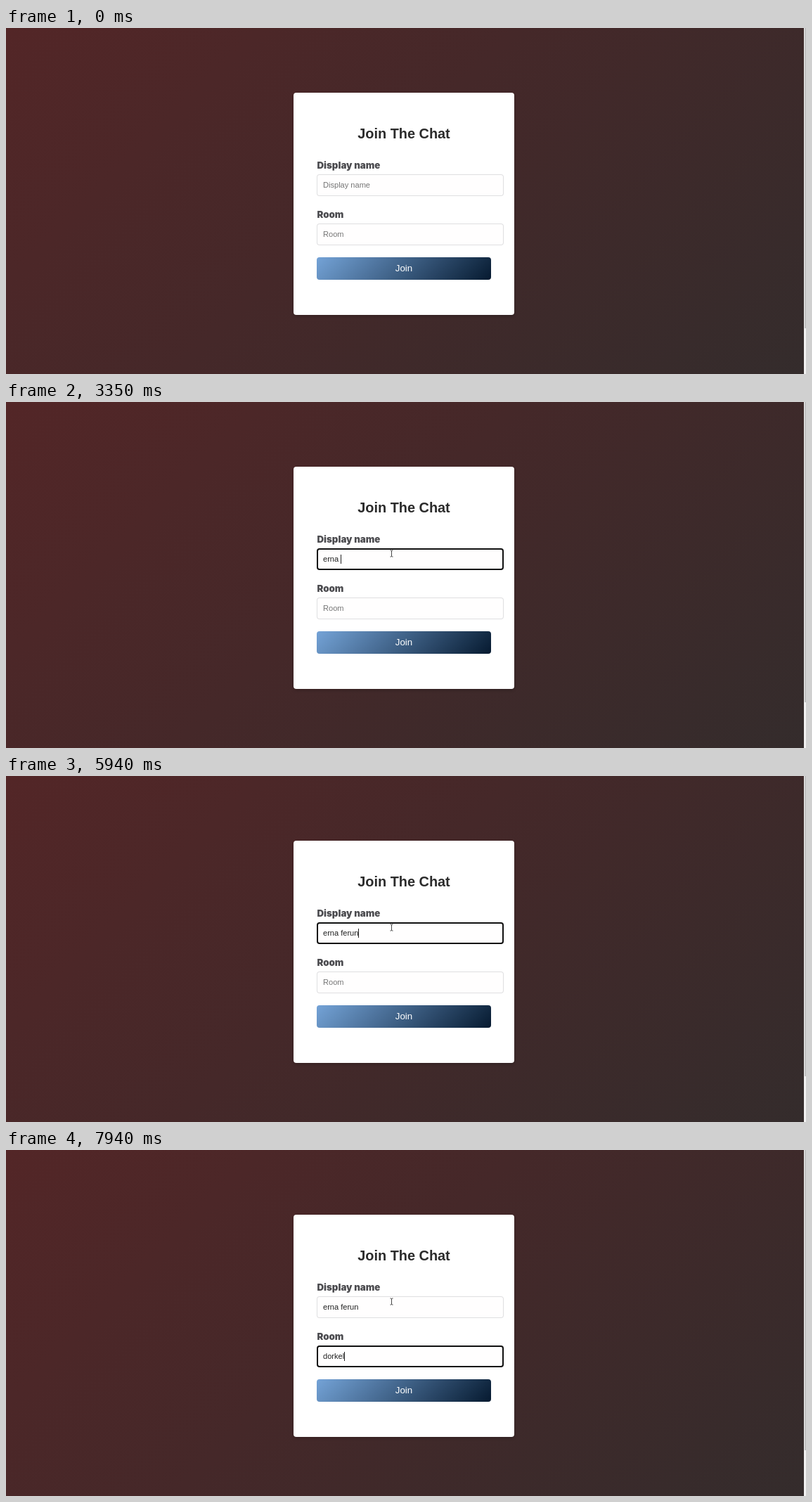
Write an HTML page that moves like this. It is 1138 px wide and 492 px high and loops after 8000 ms.

```html
<!DOCTYPE html>
<html lang="en">
<head>
<meta charset="utf-8">
<title>Join The Chat</title>
<style>
  html, body { margin: 0; width: 100%; height: 100%; overflow: hidden; }
  body {
    position: relative;
    background: linear-gradient(135deg, #532627, #452829 45%, #342c2c);
    font-family: "Liberation Sans", Arial, sans-serif;
  }
  body * { position: absolute; box-sizing: border-box; white-space: pre; }
  .card {
    left: 409px; top: 91.5px; width: 314px; height: 316px;
    border-radius: 4px; background: #fff;
    box-shadow: 0 2px 4px rgba(0, 0, 0, .2);
  }
  h1 {
    left: 409px; top: 134.6px; width: 314px; margin: 0;
    font-size: 19.9px; line-height: 30px; text-align: center; color: #2b2b2b;
  }
  label {
    left: 442.5px; color: #4c4c50;
    font: 900 13.3px/20px Inter, "Liberation Sans", sans-serif;
  }
  .field {
    left: 442px; width: 265.5px; height: 31px; padding-left: 9px;
    border-radius: 4px; background: #fffefe;
    box-shadow: inset 0 0 0 1px #dfdfe1;
    font-size: 11.07px; line-height: 31px; color: #212121;
  }
  .field.focus { box-shadow: inset 0 0 0 2px #101010; }
  .field span { position: static; }
  .hint { color: #757575; }
  .caret { top: 9px; width: 1px; height: 13px; background: #222; visibility: hidden; }
  .button {
    left: 442px; top: 326px; width: 248px; height: 31.5px;
    border-radius: 4px; background: linear-gradient(135deg, #74a3d7, #061a30);
    font-size: 13.3px; line-height: 31px; text-align: center; color: #fff;
  }
  .track { left: 1135px; top: 0; width: 3px; height: 100%; background: #f1f1f1; }
  .thumb { left: 1px; top: 0; width: 2px; height: 427px; background: #c1c1c1; }
  svg { left: 0; top: 0; }
</style>
</head>
<body>
<div class="card"></div>
<h1>Join The Chat</h1>
<label style="top:185.2px">Display name</label>
<div class="field" id="name" style="top:208px"><span class="text"></span><i class="caret"></i><span class="hint">Display name</span></div>
<label style="top:255.2px">Room</label>
<div class="field" id="room" style="top:278px"><span class="text"></span><i class="caret"></i><span class="hint">Room</span></div>
<div class="button">Join</div>
<div class="track"><div class="thumb"></div></div>
<svg width="1138" height="492">
  <g id="pointer">
    <circle id="halo" cx="-1.3" cy="0" r="9" fill="#ffff80"/>
    <path id="beam" d="M-2-4.5H-.5L0-4L.5-4.5H2M0-4V4M-2 4.5H-.5L0 4L.5 4.5H2" fill="none" stroke="#333" stroke-width=".9"/>
    <path id="arrow" d="M0 0V13.5L3.1 10.6L5.2 15.4L7.3 14.5L5.2 9.8H9.6Z" fill="#fff" stroke="#000" stroke-width=".8"/>
  </g>
</svg>
<script>
const LOOP = 8000, BLINK = 530;
const CLICK = 610, FOCUS = 690, TAB = 6270;
const START = [864, 413], END = [548.5, 215.5];

// Each key press: time and the text it leaves
const nameKeys = [
  [FOCUS, ""], [2350, "e"], [2550, "er"], [2820, "ern"], [2890, "erna"],
  [3350, "erna "], [3480, "erna f"], [3600, "erna fe"], [3740, "erna fer"],
  [3870, "erna feru"], [4000, "erna ferun"], [4330, "erna feru"],
  [4530, "erna fer"], [4600, "erna fe"], [4670, "erna f"], [4870, "erna fr"],
  [5330, "erna f"], [5410, "erna fr"], [5610, "erna fe"], [5720, "erna fer"],
  [5830, "erna feru"], [5940, "erna ferun"]
];
const roomKeys = [
  [TAB, ""], [6890, "d"], [6970, "do"], [7070, "dor"],
  [7270, "dork"], [7540, "dorke"], [7940, "dorkel"]
];

const $ = id => document.getElementById(id);
const show = (el, on) => { el.style.visibility = on ? "visible" : "hidden"; };

function drawField(id, keys, t, from, to) {
  const box = $(id);
  const [text, caret, hint] = box.children;
  const [since, value] = keys.filter(k => k[0] <= t).pop() || [0, ""];
  const focused = t >= from && t < to;
  box.classList.toggle("focus", focused);
  text.textContent = value;
  hint.style.display = value ? "none" : "";
  // small margin absorbs timer rounding in the blink
  show(caret, focused && Math.floor((t - since + 12) / BLINK) % 2 === 0);
}

function drawPointer(t) {
  const step = Math.floor((t - 70) / 67);
  const p = Math.min(1, Math.max(0, step / 7));
  const k = 1 - (1 - p) ** 2;
  const [x, y] = START.map((a, i) => a + (END[i] - a) * k);
  const overField = x > 442 && x < 707 && (y > 208 && y < 239 || y > 278 && y < 309);
  const seen = t >= 70;
  $("pointer").setAttribute("transform", `translate(${x} ${y})`);
  show($("halo"), t >= CLICK && t < FOCUS);
  show($("beam"), seen && overField);
  show($("arrow"), seen && !overField);
}

function draw(now) {
  const t = now % LOOP;
  drawField("name", nameKeys, t, FOCUS, TAB);
  drawField("room", roomKeys, t, TAB, LOOP);
  drawPointer(t);
}

const begin = performance.now();
function tick() {
  draw(performance.now() - begin);
  requestAnimationFrame(tick);
}
tick();
</script>
</body>
</html>
```
